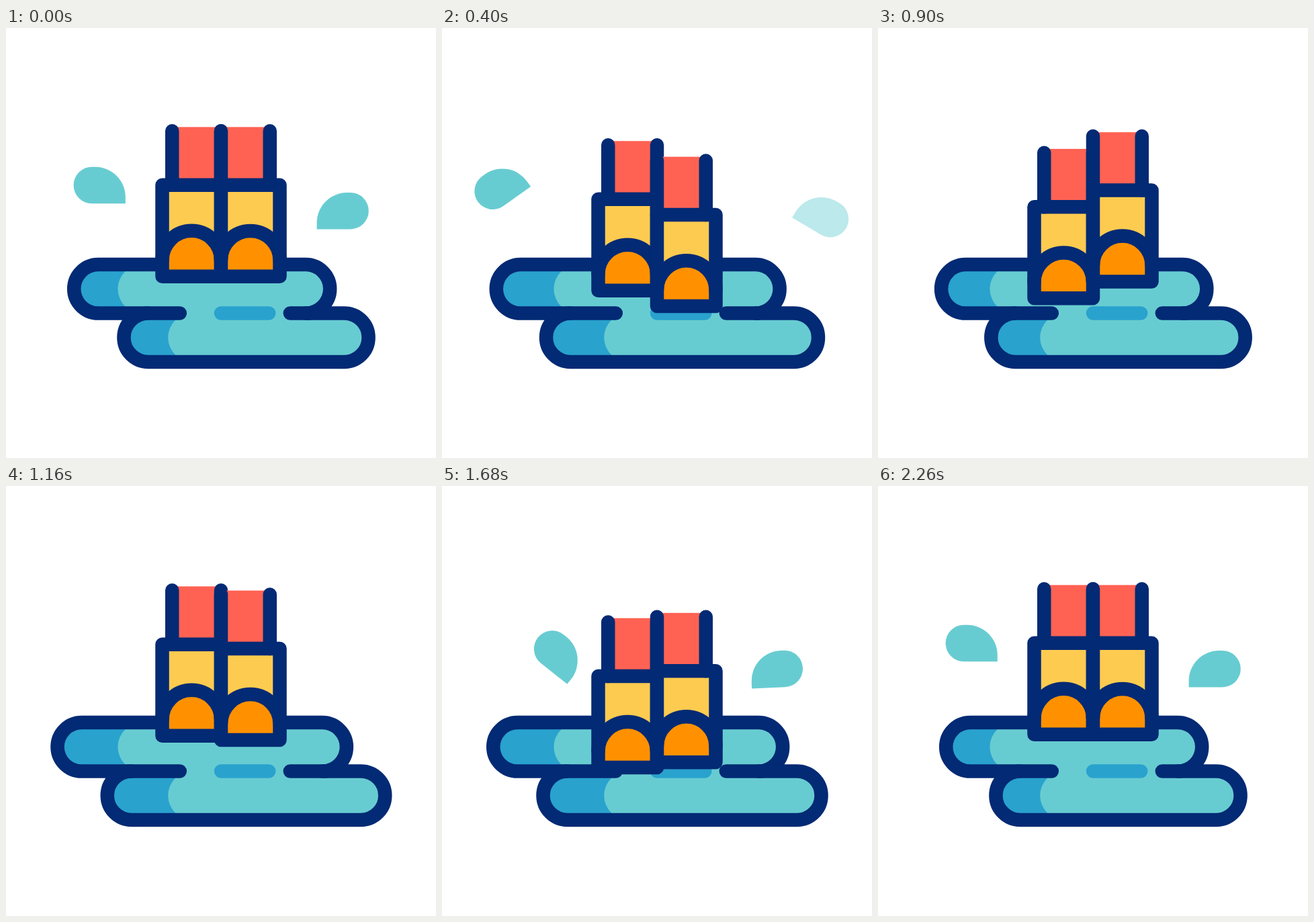
An HTML page with a canvas that plays this animation: 640x640 px, repeating every 2.4 s.

```html
<!DOCTYPE html>
<html lang="en">
<head>
<meta charset="utf-8">
<title>Feet in a puddle</title>
<style>
  html, body { margin: 0; height: 100%; overflow: hidden; background: #fff; }
  canvas { display: block; width: 100vw; height: 100vh; }
</style>
</head>
<body>
<canvas width="640" height="640"></canvas>
<script>
const ctx = document.querySelector('canvas').getContext('2d');
const LOOP = 2400;
const NAVY = '#032a74', TEAL = '#67ccd1', BLUE = '#29a2ce';
const RED = '#ff6253', YELLOW = '#fdcb50', ORANGE = '#ff9100';
const LINE = 20.5, R = 36.2, DIP = 50, SPREAD = 25;

// Times at which each swing leaves 0, reaches 1, returns to 0, and so on
const LEFT_LEG = [172, 685, 1225, 1715, 2255];
const RIGHT_LEG = [0, 507, 1030, 1536, 2085];
const PUDDLE = [0, 550, 1090, 1165, 1165, 1668, 2240];

const DROPS = [
  { x: 177.8, y: 261.2, side: -1, reach: 68, turn: 46,
    leave: [70, 550], fade: [440, 610], enter: [1420, 1965], show: [1437, 1597] },
  { x: 462.6, y: 299.4, side: 1, reach: 73, turn: 34,
    leave: [0, 500], fade: [308, 472], enter: [1200, 1745], show: [1217, 1377] }
];
const DROP = new Path2D('M0 0H50A27.2 27.2 0 0 0 50-54.4H45A45 45 0 0 0 0-9.4Z');

const ramp = (t, [a, b]) => b > a ? Math.min(1, Math.max(0, (t - a) / (b - a))) : +(t >= a);
const ease = (t, span) => { const x = ramp(t, span); return x * x * (3 - 2 * x); };

function swing(t, [start, ...times]) {
  let value = 0, from = start, sign = 1;
  for (const to of times) {
    value += sign * ease(t, [from, to]);
    from = to;
    sign = -sign;
  }
  return value;
}

function rect(color, x, y, w, h) {
  ctx.fillStyle = color;
  ctx.fillRect(x, y, w, h);
}

function pill(color, left, right, top) {
  ctx.fillStyle = color;
  ctx.beginPath();
  ctx.roundRect(left, top, right - left, 2 * R, R);
  ctx.fill();
}

function stroke(path, color = NAVY) {
  ctx.strokeStyle = color;
  ctx.stroke(new Path2D(path));
}

function puddle(grow) {
  const upper = [101.2 - grow, 482.2 + grow], lower = [175.4 - grow, 539.6 + grow];
  const top = 352.1, middle = top + 2 * R, bottom = middle + 2 * R;
  const cap = (x, y, sweep) => `A${R} ${R} 0 0 ${sweep} ${x} ${y}`;

  pill(BLUE, ...upper, top);
  pill(BLUE, ...lower, middle);
  pill(TEAL, 166.4, upper[1], top);
  pill(TEAL, 241.2, lower[1], middle);
  rect(TEAL, 262, 412, 170, 24);
  stroke(`M320 ${middle}H391.2`, BLUE);
  stroke(`M258.8 ${middle}H${upper[0] + R}${cap(upper[0] + R, top, 1)}` +
         `H${upper[1] - R}${cap(upper[1] - R, middle, 1)}`);
  stroke(`M422.8 ${middle}H${lower[1] - R}${cap(lower[1] - R, bottom, 1)}` +
         `H${lower[0] + R}${cap(lower[0] + R, middle, 1)}`);
}

// x is the centre of the leg's box; side tells where the narrower trouser edge lies
function leg(x, side, dip) {
  const half = 43.75, inner = x - side * half, outer = x + side * 29;
  const arch = `M${x - half} 345.6a${half} ${half} 0 0 1 ${2 * half} 0`;
  ctx.save();
  ctx.translate(0, dip);
  rect(RED, Math.min(inner, outer), 147.4, Math.abs(outer - inner), 86);
  rect(YELLOW, x - half, 233.8, 2 * half, 136);
  ctx.fillStyle = ORANGE;
  ctx.fill(new Path2D(arch + `V369.8H${x - half}Z`));
  stroke(arch);
  stroke(`M${x - half} 233.8h${2 * half}V369.8h${-2 * half}Z`);
  stroke(`M${inner} 153.3V233.8M${outer} 153.3V233.8`);
  ctx.restore();
}

function drop(t, d) {
  const leaving = t < LOOP / 2;
  const u = leaving ? ease(t, d.leave) : ease(t, d.enter) - 1;
  // Rising drops turn around a point below; leaving ones drift and turn around their bulb
  const [px, py] = leaving ? [50, -27.2] : [44, 29];
  ctx.save();
  ctx.globalAlpha = leaving ? 1 - ramp(t, d.fade) : ramp(t, d.show);
  ctx.translate(d.x, d.y);
  ctx.scale(d.side, 1);
  if (leaving) ctx.translate(d.reach * u, 15 * u * u);
  ctx.translate(px, py);
  ctx.rotate((leaving ? d.turn : 72) * u * Math.PI / 180);
  ctx.translate(-px, -py);
  ctx.fillStyle = TEAL;
  ctx.fill(DROP);
  ctx.restore();
}

function draw(now) {
  const t = now % LOOP;
  rect('#fff', 0, 0, 640, 640);
  ctx.lineWidth = LINE;
  ctx.lineCap = ctx.lineJoin = 'round';
  for (const d of DROPS) drop(t, d);
  puddle(SPREAD * swing(t, PUDDLE));
  leg(276.25, -1, DIP * swing(t, LEFT_LEG));
  leg(363.75, 1, DIP * swing(t, RIGHT_LEG));
}

let start;
function tick(now) {
  start ??= now;
  draw(now - start);
  requestAnimationFrame(tick);
}
draw(0);
requestAnimationFrame(tick);
</script>
</body>
</html>
```
